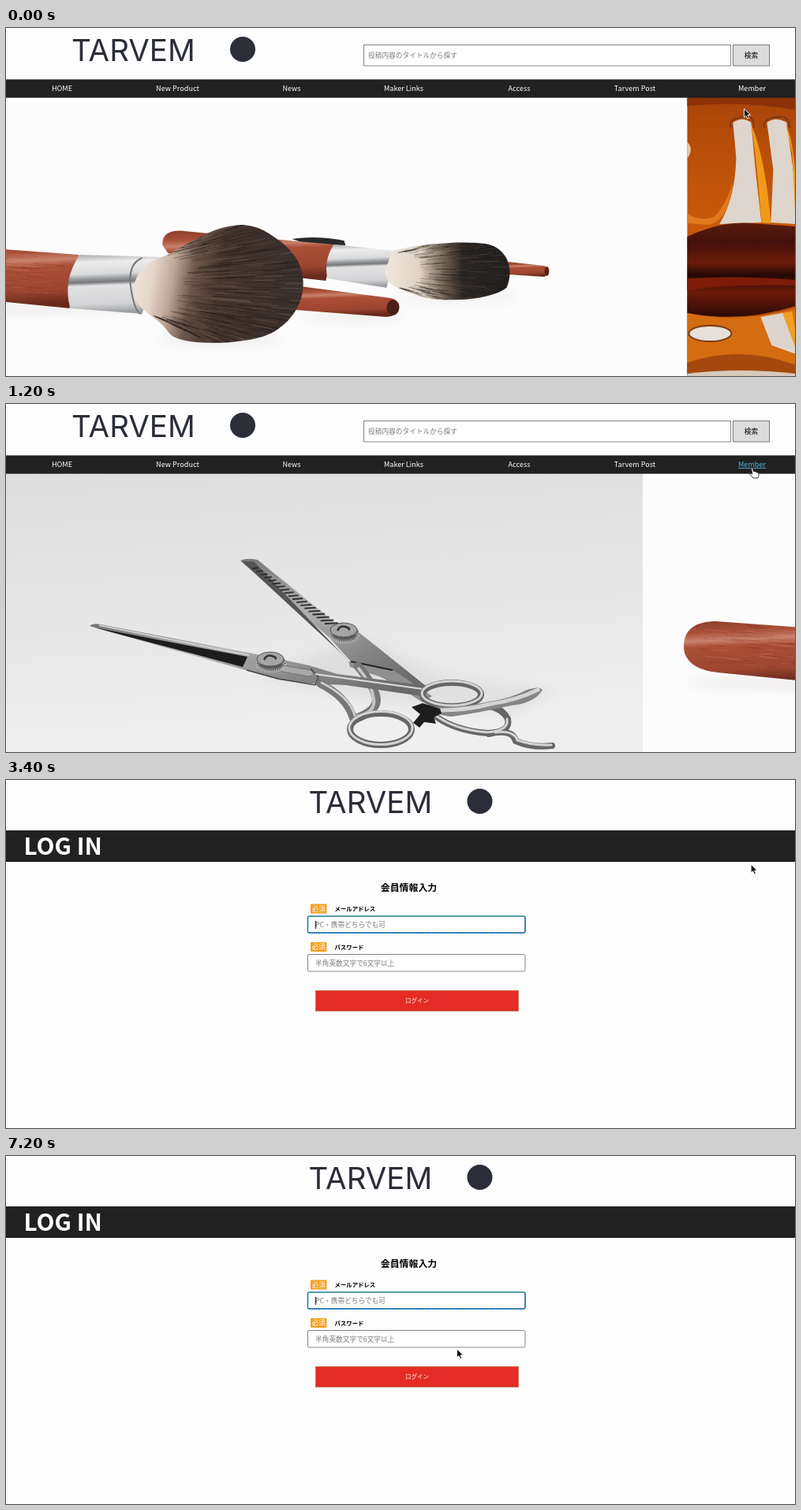
An HTML page for the animation above (7300 ms loop, 1000 by 442 pixels).

```html
<!DOCTYPE html>
<html lang="ja">
<head>
<meta charset="utf-8">
<title>Tarvem</title>
<style>
html, body { margin: 0; height: 100%; overflow: hidden; background: #fdfdfd; }
svg { display: block; width: 100vw; height: 100vh; }
text { font-family: "Noto Sans CJK JP", "Noto Sans", sans-serif; }
.mid { text-anchor: middle; }
.bold { font-weight: 700; }
.logo text { font: 400 38.5px Inter, sans-serif; fill: #2b2e38; }
.nav text { font-size: 9.1px; font-weight: 500; fill: #fff; text-anchor: middle; }
.nav .hover { fill: #4bb4d8; text-decoration: underline; }
.hint { font-size: 8.7px; fill: #7b7b7b; }
.label { font-size: 7.4px; font-weight: 700; }
.badge rect { fill: #f59f1c; }
.badge text { font-size: 8.6px; fill: #fff; text-anchor: middle; }
.box { fill: #fefefe; stroke: #858585; }
.line { fill: none; stroke-linecap: round; }
</style>
</head>
<body>
<svg viewBox="0 0 1000 442" preserveAspectRatio="none">
<defs>
  <linearGradient id="wood" x2=".12" y2="1">
    <stop stop-color="#8b3f2b"/><stop offset=".2" stop-color="#ab513a"/><stop offset=".32" stop-color="#c9826c"/>
    <stop offset=".42" stop-color="#ac4f37"/><stop offset=".8" stop-color="#9c452f"/><stop offset="1" stop-color="#672a1c"/>
  </linearGradient>
  <linearGradient id="metal" x2=".06" y2="1">
    <stop stop-color="#a9a9ab"/><stop offset=".14" stop-color="#ececed"/><stop offset=".34" stop-color="#d9dadb"/>
    <stop offset=".42" stop-color="#9a9b9e"/><stop offset=".48" stop-color="#77787c"/><stop offset=".54" stop-color="#e2e2e3"/>
    <stop offset=".85" stop-color="#d3d4d6"/><stop offset="1" stop-color="#9d9ea1"/>
  </linearGradient>
  <linearGradient id="hair" x2="1" y2=".12">
    <stop stop-color="#f1e9e3"/><stop offset=".16" stop-color="#e6d6ca"/><stop offset=".28" stop-color="#bda596"/>
    <stop offset=".4" stop-color="#6b564b"/><stop offset=".55" stop-color="#43352f"/><stop offset="1" stop-color="#3a302d"/>
  </linearGradient>
  <linearGradient id="hair2" x2="1">
    <stop stop-color="#efe7df"/><stop offset=".28" stop-color="#e0d2c3"/><stop offset=".48" stop-color="#6f6054"/>
    <stop offset=".62" stop-color="#2b2623"/><stop offset="1" stop-color="#211f1e"/>
  </linearGradient>
  <linearGradient id="table" x2=".2" y2="1">
    <stop stop-color="#dddddd"/><stop offset=".5" stop-color="#e5e5e6"/><stop offset="1" stop-color="#efefef"/>
  </linearGradient>
  <linearGradient id="steel" x2="1" y2=".8">
    <stop stop-color="#727272"/><stop offset=".4" stop-color="#b0b0b0"/><stop offset=".7" stop-color="#8b8b8b"/><stop offset="1" stop-color="#6a6a6a"/>
  </linearGradient>
  <linearGradient id="amber" x2="0" y2="1">
    <stop stop-color="#a8430a"/><stop offset=".14" stop-color="#b54c08"/><stop offset=".45" stop-color="#c95a0b"/><stop offset="1" stop-color="#a63f08"/>
  </linearGradient>
  <linearGradient id="dark" x2="0" y2="1">
    <stop stop-color="#5a1c0c"/><stop offset=".2" stop-color="#43100a"/><stop offset=".42" stop-color="#6b1b08"/><stop offset=".56" stop-color="#240806"/>
    <stop offset=".74" stop-color="#6d1a08"/><stop offset="1" stop-color="#2b0a06"/>
  </linearGradient>
  <filter id="soft" x="-30%" y="-80%" width="160%" height="260%"><feGaussianBlur stdDeviation="8"/></filter>
  <clipPath id="stage"><rect y="88" width="1000" height="354"/></clipPath>
  <path id="tuft1" d="M195 292C225 280 255 252 298 250C322 251 334 262 346 270C370 288 378 308 376 330C374 360 350 384 325 392C295 400 265 401 240 399C222 397 211 394 205 386C194 368 171 362 163 344C157 322 170 300 195 292Z"/>
  <path id="tuft2" d="M489 283C530 273 585 270 612 275C638 283 643 310 634 330C615 345 560 349 530 342C500 334 480 326 480 309Z"/>
  <clipPath id="clip1"><use href="#tuft1"/></clipPath>
  <clipPath id="clip2"><use href="#tuft2"/></clipPath>
  <g id="logo" class="logo"><text x="83" y="42">TARVEM</text><circle cx="300" cy="27" r="16" fill="#2b2e38"/></g>
</defs>
<rect width="1000" height="442" fill="#fdfdfd"/>

<g id="home">
  <use href="#logo"/>
  <rect class="box" x="453.5" y="21.500" width="465" height="26.500"/>
  <text class="hint" x="459" y="38">投稿内容のタイトルから探す</text>
  <rect x="921.5" y="21.500" width="46" height="26.500" fill="#dcdcdc" stroke="#7a7a7a"/>
  <text class="mid" x="944.5" y="38" font-size="8.7" font-weight="500">検索</text>
  <g clip-path="url(#stage)"><g id="strip">

    <g id="scissors" transform="translate(221)">
      <rect x="-221" y="88" width="1028" height="354" fill="url(#table)"/>
      <g filter="url(#soft)" opacity=".22">
        <path d="M320 345L470 378 640 395 700 365 560 345 440 300Z" fill="#b5b5b5"/>
        <path d="M430 285L540 345 480 330Z" fill="#aaa"/>
      </g>
      <!-- comb blade -->
      <path d="M297 199Q305 195 319 198L416 277 442 286 532 358 520 370 437 327 410 297Z" fill="url(#steel)"/>
      <path d="M299 200L314 200 434 326 420 312Z" fill="#555"/>
      <g id="teeth"></g>
      <path d="M434 327L492 339 540 371 528 379 482 349 436 334Z" fill="#8f8f8f"/>
      <path d="M437 327L490 338" stroke="#222" stroke-width="2"/>
      <path class="line" d="M446 333Q465 355 469 372T442 400" stroke="#777" stroke-width="11"/>
      <path class="line" d="M447 336Q463 355 466 374T443 397" stroke="#c5c5c5" stroke-width="4"/>
      <!-- long blade -->
      <path d="M106 282Q110 278 120 280L318 318 384 332 420 343 535 358 528 371 430 357 385 355 345 350 300 337Z" fill="url(#steel)"/>
      <path d="M112 284L306 321 300 334Z" fill="#1c1c1c"/>
      <path d="M118 281L308 319" stroke="#d0d0d0" stroke-width="2"/>
      <path d="M305 338L345 349 392 357 396 347 386 336" fill="none" stroke="#444" stroke-width="1.5"/>
      <path d="M345 331L386 338Q394 344 384 346L350 340Z" fill="#a8a8a8" stroke="#666" stroke-width=".8"/>
      <path d="M392 343L528 362" stroke="#ddd" stroke-width="2"/>
      <path class="line" d="M398 355Q432 372 440 399" stroke="#777" stroke-width="10"/>
      <path class="line" d="M400 354Q436 372 442 396" stroke="#ccc" stroke-width="3"/>
      <!-- finger rings -->
      <g class="line" stroke="#666" stroke-width="8">
        <ellipse cx="475" cy="413" rx="39" ry="20"/><ellipse cx="565" cy="369" rx="37" ry="15"/>
        <path d="M545 397Q570 415 610 418Q640 417 636 400Q630 388 614 384"/>
        <path d="M612 419Q642 412 646 428Q666 437 692 434"/>
      </g>
      <path d="M536 384Q580 386 612 378Q640 374 660 363Q676 358 680 363Q670 380 640 383Q600 392 565 397Q545 396 536 384Z" fill="#858585"/>
      <g class="line" stroke="#d4d4d4" stroke-width="3">
        <ellipse cx="475" cy="411.500" rx="40" ry="21"/><ellipse cx="565" cy="367.500" rx="38" ry="15.500"/>
        <path d="M545 396Q570 414 610 417Q638 415 635 400"/>
        <path d="M548 389Q585 389 614 381Q648 376 674 363" stroke-width="5"/><path d="M620 417Q644 414 648 427Q668 434 691 433"/>
      </g>
      <path d="M514 385L528 380 550 387 552 393 542 398 545 406 530 404 524 411 516 405 525 394Z" fill="#1d1d1d"/>
      <!-- screws -->
      <g id="screw"><ellipse cx="336" cy="328" rx="18" ry="11" fill="#5b5b5b"/>
        <ellipse cx="336" cy="331" rx="17" ry="8" fill="none" stroke="#bbb" stroke-width="5" stroke-dasharray="1 1.5"/>
        <ellipse cx="335" cy="324" rx="17" ry="9" fill="#a5a5a5" stroke="#555"/>
        <path d="M327 325Q330 318 337 320T341 324" fill="none" stroke="#333" stroke-width="2.5"/></g>
      <use href="#screw" x="93" y="-37"/>
    </g>

    <g id="brushes" transform="translate(1193)">
      <rect x="-165" y="88" width="1028" height="354" fill="#fcfcfc"/>
      <g filter="url(#soft)" fill="#d9d4d2" opacity=".5">
        <ellipse cx="30" cy="354" rx="140" ry="6"/><ellipse cx="270" cy="395" rx="80" ry="6"/>
        <ellipse cx="440" cy="366" rx="65" ry="5"/><ellipse cx="570" cy="341" rx="80" ry="5"/>
      </g>
      <path d="M362 268Q392 263 428 270L430 276 380 274Z" fill="#292929"/>
      <path d="M198 276C197 261 208 256 226 258L415 275 405 321 360 316 205 286Z" fill="url(#wood)"/>
      <path d="M415 275L494 283 482 330 407 318Q402 295 415 275Z" fill="url(#metal)"/>
      <path d="M636 297L682 302Q689 305 687 312L682 316 636 313Z" fill="url(#wood)"/>
      <ellipse cx="685" cy="309" rx="3" ry="6" fill="#5b2418"/>
      <use href="#tuft2" fill="url(#hair2)"/>
      <g id="hairs2" clip-path="url(#clip2)"></g>
      <path d="M372 328L487 343Q499 346 498 356Q494 367 482 367L366 358Z" fill="url(#wood)"/>
      <ellipse cx="490" cy="355" rx="8" ry="10" fill="#4a1f18"/>
      <path d="M-113 308C-113 286-98 276-72 276L92 288 80 356-70 341C-98 338-113 326-113 308Z" fill="url(#wood)"/>
      <g id="grain"></g>
      <path d="M93 288L198 291 172 363 81 356Q71 320 93 288Z" fill="url(#metal)"/>
      <path d="M172 292Q153 300 158 331T171 363" fill="none" stroke="#77787a" stroke-width="2"/>
      <use href="#tuft1" fill="url(#hair)"/>
      <g id="hairs1" clip-path="url(#clip1)"></g>
    </g>

    <g id="glass" transform="translate(1193)">
      <rect x="863" y="88" width="1028" height="354" fill="url(#amber)"/>
      <path d="M863 99Q930 92 1000 104V88H863Z" fill="#8d3208"/>
      <path d="M863 145Q872 153 863 166Z" fill="#eac9a5"/>
      <path d="M921 120Q933 112 944 120L950 185 957 247 904 249Q924 215 925 165Z" fill="#ded5cc"/>
      <path d="M964 120Q975 112 989 120L1000 200V249L969 247 972 180Z" fill="#ded5cc"/>
      <path d="M944 122Q952 175 957 247L969 248Q962 165 944 122ZM988 122L996 160 1000 240V190Q998 145 988 122Z" fill="#f29a18"/>
      <path d="M918 127Q914 116 932 113T947 127M961 127Q957 116 975 113T993 127" fill="none" stroke="#7d3a1a" stroke-width="2"/>
      <path d="M863 236Q880 246 897 240Q912 225 921 196Q916 243 891 250L863 248Z" fill="#e07a1c"/>
      <path d="M863 265Q905 245 945 248L1000 252V353Q930 375 863 362Z" fill="url(#dark)"/>
      <path d="M863 318Q930 314 1000 320V327Q920 325 863 333Z" fill="#7d1c08"/>
      <path d="M863 362Q930 376 1000 356V442H863Z" fill="#d46c12"/>
      <ellipse cx="892" cy="388" rx="27" ry="10" fill="#e7e0d8" stroke="#7a3a12" stroke-width="2"/>
      <path d="M956 367L984 362 1000 405V414L970 403Z" fill="#ddd5cd"/>
      <path d="M984 362L996 360 1000 385V405Z" fill="#f0a020"/>
      <path d="M863 425Q930 402 1000 428V442H863Z" fill="#a5480e"/>
      <path d="M863 439Q930 431 1000 439V442H863Z" fill="#d7cabd"/>
    </g>
  </g></g>
  <rect y="65.300" width="1000" height="23.300" fill="#212121"/>
  <g class="nav">
    <text x="71" y="80">HOME</text><text x="217.5" y="80">New Product</text><text x="362" y="80">News</text>
    <text x="504" y="80">Maker Links</text><text x="650.5" y="80">Access</text><text x="797" y="80">Tarvem Post</text>
    <text id="member" x="945.5" y="80">Member</text>
  </g>
  <g id="menu" class="mid" font-size="8.5">
    <rect id="login" x="935.5" y="91.5" width="41" height="16" rx="5" fill="#45b9c1" stroke="#2b7f88" stroke-dasharray="1 1"/>
    <text id="loginText" x="956" y="103">ログイン</text>
    <rect x="935" y="117" width="43" height="17" rx="5" fill="#212121"/>
    <text x="956.5" y="129" fill="#e8e8e8">新規登録</text>
  </g>
</g>

<g id="form">
  <use href="#logo" x="300.5"/>
  <rect y="64" width="1000" height="40" fill="#212121"/>
  <text class="bold" x="22.500" y="94.5" font-size="29.800" fill="#fff">LOG IN</text>
  <text class="mid bold" x="510.5" y="141" font-size="11.9">会員情報入力</text>
  <g id="badge" class="badge"><rect x="386" y="157.5" width="20.5" height="12" rx="1"/><text x="396.3" y="166.6">必須</text></g>
  <use href="#badge" y="48.5"/>
  <text class="label" x="416.5" y="166">メールアドレス</text>
  <text class="label" x="416.5" y="214.5">パスワード</text>
  <rect class="box" x="382.5" y="173" width="275.5" height="21" rx="2" style="stroke:#16808f;stroke-width:1.5"/>
  <path d="M384 194.3H657M658 175V192" stroke="#1f62c4" stroke-width="1.3" stroke-dasharray="2 1"/>
  <text class="hint" x="392" y="187">PC・携帯どちらでも可</text>
  <rect id="caret" x="392" y="179" width="1" height="10" fill="#222"/>
  <rect class="box" x="382.5" y="221.5" width="275.5" height="21.5" rx="1.5"/>
  <text class="hint" x="392" y="236">半角英数文字で6文字以上</text>
  <rect x="392.5" y="267.5" width="257" height="26" fill="#e42b26" stroke="#94653a" stroke-dasharray="1 1"/>
  <text class="mid" x="521" y="283.3" font-size="7.5" fill="#fff">ログイン</text>
</g>

<g id="cursor" stroke="#fff" stroke-width=".9">
  <path id="arrow" d="M0 0V11L2.5 8.8 4.3 12.7 6.2 11.9 4.5 8H8Z" fill="#111"/>
  <path id="hand" d="M-1 1Q0-1 1 1L2.2 5Q3.5 4 4.3 5.3Q5.7 4.5 6.3 6Q8 5.5 8.3 7.5Q9.2 11 7.5 13H1.5L-2.5 8.5Q-2.5 6.8-.5 7.5L.5 8Z" fill="#fff" stroke="#222"/>
</g>
</svg>
<script>
const LOOP = 7300, STEP = 100, TRAVEL = 2056, LOGIN_AT = 3000;
const $ = id => document.getElementById(id);
const show = (id, on) => $(id).style.display = on ? "" : "none";
const repeat = (n, make) => Array.from({ length: n }, (_, i) => make(i)).join("");

let seed = 7;
const rnd = (a, b) => a + (b - a) * (seed = seed * 16807 % 2147483647) / 2147483647;
const stroke = (d, color, width, opacity = 1) =>
  `<path d="${d}" stroke="${color}" stroke-width="${width}" opacity="${opacity.toFixed(2)}"/>`;

// Short hairs along rays that fan out from a root to an elliptic rim.
function hairs(id, count, [rx0, ry0, spread], [cx, cy, rx, ry], colors) {
  $(id).innerHTML = repeat(count, i => {
    const a = rnd(-2, 2), x1 = cx + rx * Math.cos(a), y1 = cy + ry * Math.sin(a);
    const y0 = ry0 + spread * Math.sin(a), from = rnd(.3, .95);
    const at = k => `${(rx0 + (x1 - rx0) * k).toFixed(1)} ${(y0 + (y1 - y0) * k).toFixed(1)}`;
    return stroke(`M${at(from)}L${at(from + rnd(.08, .25))}`, colors[i % colors.length], .8, rnd(.25, .65));
  });
}
hairs("hairs1", 600, [150, 325, 25], [286, 326, 91, 76], ["#1d1614", "#4a3a32", "#82695c", "#2a211e"]);
hairs("hairs2", 220, [475, 307, 16], [565, 309, 75, 38], ["#141211", "#3b342f", "#5e5349"]);

$("grain").innerHTML = repeat(70, i => {
  const x = rnd(-95, 40), y = rnd(283, 335) + x * .08, w = rnd(12, 45);
  return stroke(`M${x.toFixed(1)} ${y.toFixed(1)}l${w.toFixed(1)} ${(w * .08).toFixed(1)}`, i % 2 ? "#d58a72" : "#6e2a1b", .8, rnd(.2, .5));
});
$("teeth").innerHTML = repeat(19, i => stroke(`M${312 + i * 5.1} ${209 + i * 3.9}l${8 + i * .5} -1`, "#2b2b2b", 1.8));

// Linear interpolation over [time, ...values] rows.
function track(rows, t) {
  const i = rows.findIndex(r => r[0] > t);
  if (i < 0) return rows[rows.length - 1].slice(1);
  const a = rows[i - 1], b = rows[i], k = (t - a[0]) / (b[0] - a[0]);
  return a.slice(1).map((v, j) => v + (b[j + 1] - v) * k);
}

// The CSS "ease" curve.
function ease(x) {
  let lo = 0, hi = 1;
  for (let i = 0; i < 30; i++) {
    const s = (lo + hi) / 2;
    if (.75 * s * (1 - s) + s ** 3 < x) lo = s; else hi = s;
  }
  return 1 - (1 - lo) ** 2 * (1 + 1.7 * lo);
}

const slide = [[0, .2552], [400, .3775], [1200, .611], [2000, .8559], [2500, 1], [2700, 1.05], [3200, 1.2]];
const pointer = [[0, 935.5, 102.5], [400, 940.5, 97.5], [900, 945.5, 81], [1500, 945.5, 81], [1900, 945.5, 108.5],
  [2400, 945.5, 108.5], [2700, 944.5, 107], [4900, 943.5, 107], [5600, 690, 190], [6300, 571.5, 245]];

function draw(t) {
  const home = t < LOGIN_AT, hand = t >= 900 && t < 3400, onLogin = t >= 1800;
  const [p] = track(slide, t), [x, y] = track(pointer, t);
  const offset = p < 1 ? ease(p) - 1 : -ease(p - 1);
  show("home", home);
  show("form", !home);
  show("menu", t >= 1500);
  show("hand", hand);
  show("arrow", !hand);
  show("caret", (t - LOGIN_AT) % 1000 < 500);
  $("member").setAttribute("class", t >= 900 && t < 1700 ? "hover" : "");
  $("login").setAttribute("fill", onLogin ? "#45b9c1" : "#212121");
  $("loginText").setAttribute("fill", onLogin ? "#111" : "#e8e8e8");
  $("strip").setAttribute("transform", `translate(${(TRAVEL * offset).toFixed(2)})`);
  $("cursor").setAttribute("transform", `translate(${x.toFixed(1)} ${y.toFixed(1)})`);
}

const start = performance.now();
function tick() {
  const t = (performance.now() - start) % LOOP;
  draw(Math.floor(t / STEP) * STEP);
  requestAnimationFrame(tick);
}
tick();
</script>
</body>
</html>
```
